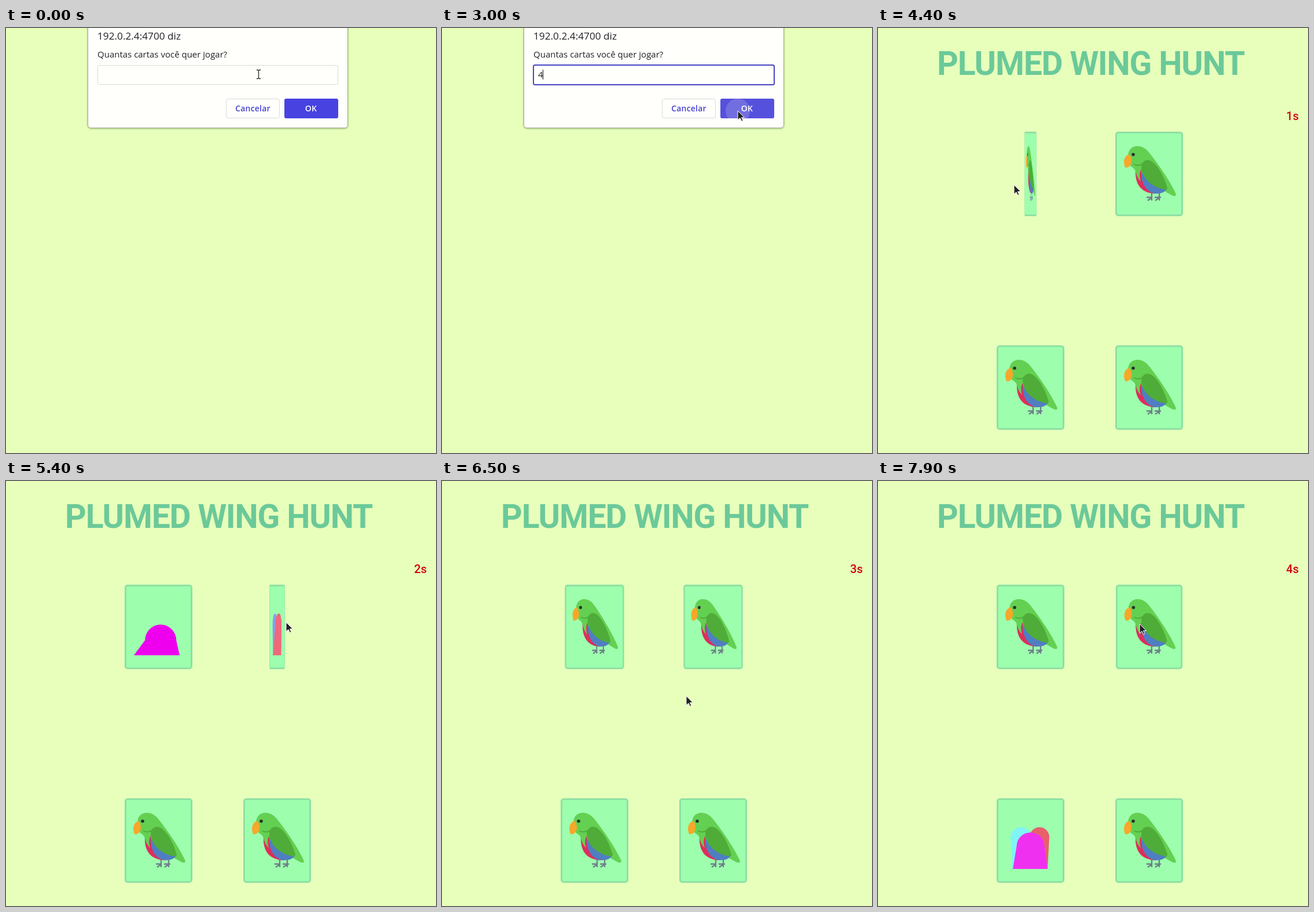
Recreate the animation shown at these times as an HTML page. Size 743x734 px, loop 8000 ms.

```html
<!DOCTYPE html>
<html lang="pt-BR">
<head>
<meta charset="utf-8">
<title>Memory cards</title>
<style>
  html, body { margin: 0; width: 100%; height: 100%; overflow: hidden; background: #e7ffbb; }
  svg { display: block; width: 100%; height: 100%; }
  .ui { font-family: "Open Sans", "Noto Sans", sans-serif; fill: #202124; }
  .btn { font-size: 14px; font-weight: 600; letter-spacing: .2px; text-anchor: middle; }
  .title { font: 700 57px Roboto, sans-serif; letter-spacing: -1.2px; text-anchor: middle; fill: #6bc999; }
  .clock { font: 500 20px Roboto, sans-serif; text-anchor: end; fill: #d3000c; }
</style>
</head>
<body>
<svg viewBox="0 0 743 734">
  <defs>
    <filter id="shadow" x="-5%" y="-10%" width="110%" height="125%">
      <feDropShadow dx="0" dy="1" stdDeviation="1.5" flood-color="#31421d" flood-opacity=".4"/>
    </filter>
    <clipPath id="okClip"><rect x="481" y="122" width="93" height="34" rx="3"/></clipPath>
    <g id="bird">
      <path fill="#64d052" d="M227 222C227 210 234 204 243 204C253 204 260 210 265 217C276 231 296 258 309 285Q312 293 303 289L285 279L264 284Q241 274 240 250Q240 243 232 239Q227 232 227 222Z"/>
      <path fill="#dd2e5c" d="M240 247C239 271 251 285 274 286L280 284C262 276 251 263 250 244C246 250 247 259 249 265C244 260 241 254 240 247Z"/>
      <path fill="#4f7ec2" d="M250 248C249 269 260 285 276 286C285 286 292 283 295 276C280 276 261 264 250 248Z"/>
      <path fill="#4fac38" d="M250 240C251 228 261 225 269 231C280 239 289 257 294 273C296 278 295 279 291 279C275 277 251 264 250 240Z"/>
      <path fill="none" stroke="#4fac38" stroke-width="2" d="M237 235Q246 240 254 233"/>
      <path fill="#f7a72a" d="M229 218C220 221 218 231 222 241C228 242 233 237 233 230C233 224 231 220 229 218Z"/>
      <circle cx="236" cy="218.500" r="2.800" fill="#27312e"/>
      <path fill="none" stroke="#6d7f88" stroke-width="2.300" d="M268 285V298M259 292.500H269M268 293L261 298M281 285V298M273 292.500H284M281 293L274 298"/>
    </g>
  </defs>
  <g id="stage"></g>
</svg>
<script>
const LOOP = 8000, STEP = 100;
const stage = document.getElementById('stage');

// Pointer path: time, x, y
const PATH = [
  [2200, 436, 80], [2300, 465, 100], [2500, 575, 157], [2800, 511, 143],
  [3500, 511, 143], [3900, 241, 280], [4100, 211, 279], [4200, 211, 279],
  [4400, 235, 271], [4500, 235, 271], [5000, 484, 244], [5400, 484, 244],
  [6000, 483, 242], [6300, 483, 242], [6900, 300, 630], [7200, 307, 620],
  [7300, 307, 620], [7800, 452, 247], [8000, 452, 247]
];

// Card position, flip start times and face
const CARDS = [
  { x: 0, y: 0, flips: [4267, 6230], face: soloFace },
  { x: 205, y: 0, flips: [5234, 6230, 7864], face: trioFace },
  { x: 0, y: 369, flips: [6950], face: trioFace },
  { x: 205, y: 369, flips: [], face: soloFace }
];

const SOLO = ['#ff7b7b', '#f8db84', '#8cf58c', '#82f5f5', '#ee00ee',
              '#d081ff', '#81acff', '#ff81ff', '#ff6bb5', '#ff6b6b'];
const FRONT = ['#f84f9c', '#f0697b', '#d84cf5', '#f0697b', '#f0697b',
               '#f5d57c', '#78ee88', '#78eeee', '#8c9bf0', '#f030f0'];
const LEFT = ['#80c8f5', '#8c9bf0', '#60e880', '#8c9bf0', '#8c9bf0',
              '#d880f0', '#f080c8', '#f0697b', '#f5d57c', '#80f5f5'];
const FRONT_X = [5, 9, -6, 4, 9, -5, -7, -9, -5, 0];

function ease(p) {
  if (p <= 0) return 0;
  if (p >= 1) return 1;
  let lo = 0, hi = 1;
  for (let i = 0; i < 24; i++) {
    const s = (lo + hi) / 2;
    if (.75 * s * (1 - s) + s ** 3 < p) lo = s; else hi = s;
  }
  return .3 * lo * (1 - lo) ** 2 + 3 * lo * lo * (1 - lo) + lo ** 3;
}

function pointerAt(t) {
  const i = PATH.findIndex(p => p[0] > t);
  const [t0, x0, y0] = PATH[i - 1], [t1, x1, y1] = PATH[i];
  const k = (t - t0) / (t1 - t0);
  return [x0 + (x1 - x0) * k, y0 + (y1 - y0) * k];
}

const rect = (x, y, w, h, r, attrs) =>
  `<rect x="${x}" y="${y}" width="${w}" height="${h}" rx="${r}" ${attrs}/>`;
const text = (x, y, cls, str, attrs = '') =>
  `<text x="${x}" y="${y}" class="${cls}" ${attrs}>${str}</text>`;

// Plain round-topped hill on a fixed base
const hill = (x, top, r, left, right, color) =>
  `<path fill="${color}" d="M${left} 301L${x - r} ${top + r}a${r} ${r} 0 0 1 ${2 * r} 0L${right} 301Z"/>`;

function soloFace(k) {
  const a = k * Math.PI / 5;
  return hill(262.5 + 8 * Math.sin(a), 238.5 - 11.7 * Math.cos(a), 27, 221, 300, SOLO[k]);
}

function trioFace(k) {
  const dx = FRONT_X[k];
  return hill(247, 229, 18, 232, 280, LEFT[k]) + hill(279, 229, 17, 250, 293, '#e8606c') +
    hill(263.5 + dx, 238 - Math.abs(dx), 24, 233, 293, FRONT[k]);
}

function card({ x, y, flips, face }, t) {
  let angle = 0;
  flips.forEach((start, i) => {
    angle += (i % 2 ? -1 : 1) * Math.PI * ease((t - start) / 500);
  });
  const c = Math.cos(angle), sx = Math.max(Math.abs(c), .01);
  const art = c > 0 ? '<use href="#bird"/>' : face(t / STEP % 10);
  return `<g transform="translate(${x + 263.5} ${y}) scale(${sx} 1) translate(-263.5 0)">` +
    rect(206.5, 180.5, 114, 143, 3.5, 'fill="#9dffae" stroke="#8fe0a4" stroke-width="3"') + art + '</g>';
}

function dialog(t) {
  const focus = t >= 700, typed = t >= 2000;
  const hover = t >= 2600;
  const caretOn = focus && Math.floor((t - (typed ? 2000 : 700)) / 500) % 2 === 0;
  const caretX = typed ? 174 : 166;
  let s = rect(141.5, -20, 449, 192.5, 5, 'fill="#fffffc" stroke="#9bad8d" filter="url(#shadow)"');
  s += text(158, 20, 'ui', '192.0.2.4:4700 diz', 'font-size="17.2"');
  s += text(158, 51, 'ui', 'Quantas cartas você quer jogar?', 'font-size="15"');
  s += focus
    ? rect(158, 64, 416, 34, 2.5, 'fill="#fffffc" stroke="#4745c1" stroke-width="2"')
    : rect(158.5, 64.5, 415, 33, 2.5, 'fill="#fffffc" stroke="#d8dcd2"');
  if (typed) s += text(166, 86, 'ui', '4', 'font-size="15"');
  if (caretOn) s += rect(caretX, 72, 1, 17, 0, 'fill="#111"');
  s += rect(380.5, 122.5, 92, 33, 3.5, 'fill="#fffffc" stroke="#d8dcd8"');
  s += text(426.5, 144, 'ui btn', 'Cancelar', 'style="fill:#4741d4"');
  s += rect(481, 122, 93, 34, 3, `fill="${hover ? '#5551dd' : '#4842e1'}"`);
  if (t >= 2900) {
    const r = 12 + (t - 2900) * .09;
    s += `<circle cx="511" cy="143" r="${r}" fill="#726ee0" clip-path="url(#okClip)"/>`;
  }
  return s + text(527, 144, 'ui btn', 'OK', 'style="fill:#fff"');
}

function board(t) {
  const secs = [4100, 5100, 6000, 7000].filter(s => t >= s).length;
  return text(367.5, 81, 'title', 'PLUMED WING HUNT') +
    text(727, 159, 'clock', secs + 's') +
    CARDS.map(c => card(c, t)).join('');
}

function pointer(t) {
  if (t >= 400 && t < 2200) return '';
  const [x, y] = t < 400 ? [436, 80] : pointerAt(t);
  const beam = x < 574 && y < 98 && t < 3000;
  const shape = beam
    ? '<path fill="none" stroke="#222" stroke-width="1.3" d="M-3 -7.500H-1L.5 -6.500L2 -7.500H4M.5 -6.500V6.500M-3 7.500H-1L.5 6.500L2 7.500H4"/>'
    : '<path fill="#222" stroke="#fff" stroke-width="1" d="M0 0V16L4 12.500L6.500 18L9 17L6.500 11.500H11.500Z"/>';
  return `<g transform="translate(${x} ${y})">${shape}</g>`;
}

function render(t) {
  const view = t < 3100 ? dialog(t) : t < 3200 ? '' : board(t);
  stage.innerHTML = view + pointer(t);
}

// The picture advances in tenths of a second
let start = null, shown = -1;
function tick(now) {
  if (start === null) start = now;
  const t = Math.floor((now - start) % LOOP / STEP) * STEP;
  if (t !== shown) render(shown = t);
  requestAnimationFrame(tick);
}
render(0);
requestAnimationFrame(tick);
</script>
</body>
</html>
```
